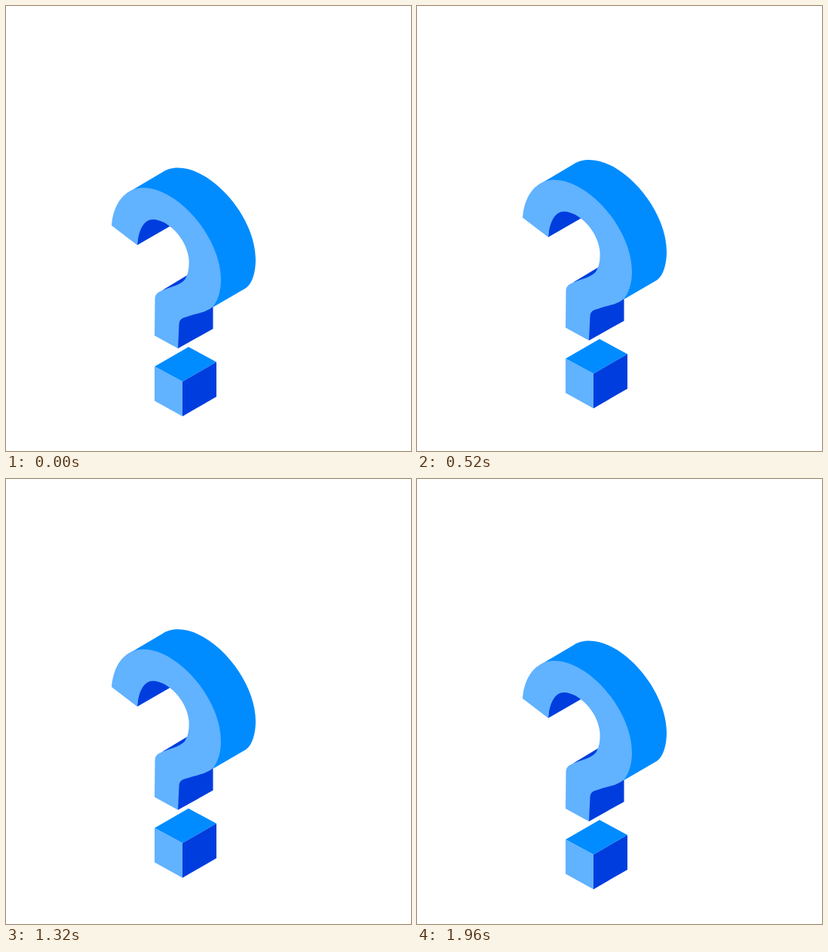
Recreate the animation shown at these times as an HTML page. Size 537 by 590 pixels, loop 2000 ms.

```html
<!DOCTYPE html>
<html lang="en">
<head>
<meta charset="utf-8">
<title>Floating question mark</title>
<style>
  html, body { margin: 0; width: 100%; height: 100%; overflow: hidden; background: #fff; }
  svg { display: block; width: 537px; height: 590px; }
  .light { fill: #61b2ff; }
  .mid { fill: #008cff; }
  .dark { fill: #003dde; }
</style>
</head>
<body>
<svg viewBox="0 0 537 590">
  <g id="mark">
    <!-- inner and lower sides of the hook -->
    <path class="dark" d="M174 317 L220 290.5 L195 281 L176 290 Z"/>
    <path class="dark" d="M207 377 L241 356.5 L245 354 L243 364 L228 374 Z"/>
    <path class="dark" d="M228 454 L274.5 428 V394 L240 407 L227 420 Z"/>
    <!-- outer side -->
    <path class="mid" d="M164 246 L208 220 C214 216 221 214.5 228 214.5
      C274 214.5 331 280.5 331 336.5 C331 352 327 368 318 374 L275 399
      L270 390 L280 363 C280 310 226 246 182 246 Z"/>
    <!-- front face -->
    <path class="light" d="M140 291 C142 262 158 241 182 241 C228 241 285 307 285 363
      C285 378 281 390 275 398 C265 407 254 407 240 412 C232 414 230 416 229.5 422
      L228 454 L197 437 L197.5 388 C198 381 202 379 210 376
      C220 372 230 370 237 363 C241 356 243 350 242.5 336
      C240 308 214 283 195 283 C183 283 176 296 174 317 Z"/>
    <!-- dot -->
    <path class="mid" d="M197 478 L242 452 L279 472 L234 498 Z"/>
    <path class="dark" d="M234 498 L279 472 V518 L234 544 Z"/>
    <path class="light" d="M197 478 L234 498 V544 L197 523.5 Z"/>
  </g>
</svg>
<script>
  const LOOP = 2000, STEP = 40, LIFT = 20;
  const mark = document.getElementById('mark');
  const ease = p => p * p * (3 - 2 * p);

  function draw(ms) {
    const time = Math.floor((ms % LOOP) / STEP) * STEP;
    const rise = 1 - Math.abs(1 - time / (LOOP / 2));
    mark.setAttribute('transform', `translate(0 ${-LIFT * ease(rise)})`);
  }

  const start = performance.now();
  function tick() {
    draw(performance.now() - start);
    requestAnimationFrame(tick);
  }
  tick();
</script>
</body>
</html>
```
